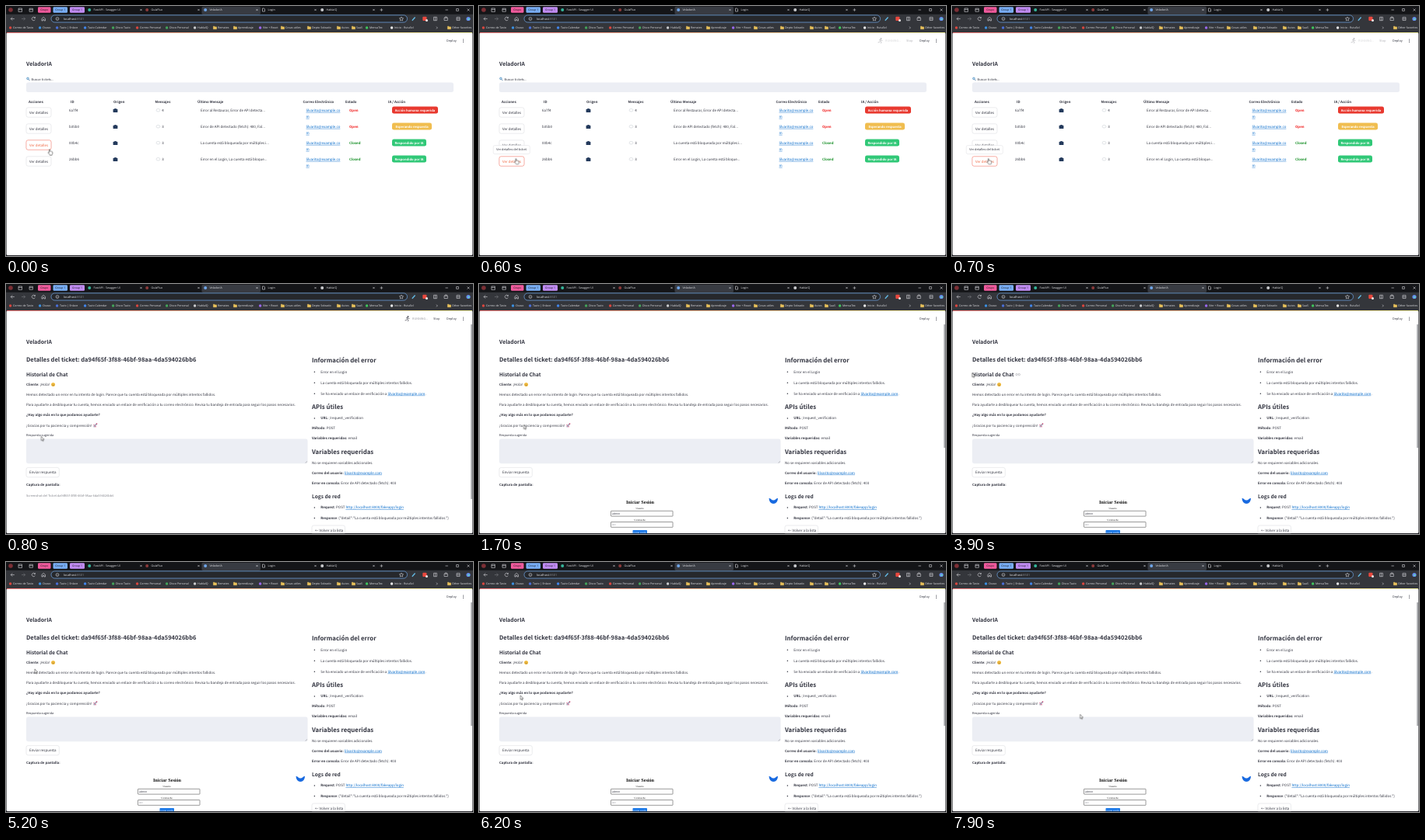
Recreate the animation shown at these times as an HTML page. Size 600 by 322 pixels, loop 8000 ms.

```html
<!DOCTYPE html>
<html lang="es">
<head>
<meta charset="utf-8">
<title>Panel de tickets</title>
<style>
html, body { margin: 0; width: 100%; height: 100%; overflow: hidden; background: #1e1f23; }
svg { display: block; width: 100vw; height: 100vh; }
text { font-family: "Noto Sans CJK JP", "Noto Sans CJK SC", "Noto Sans CJK KR", "Open Sans", sans-serif;
  text-rendering: geometricPrecision; fill: #31333f; white-space: pre; }
.b { font-weight: 700; }
tspan.b { font-size: 4.36px; }
.ui { font-family: "Open Sans", "Noto Sans", sans-serif; fill: #e6e7ea; }
.serif { font-family: "Liberation Serif", serif; fill: #111; }
.link { fill: #0068c9; text-decoration: underline; }
.mid { text-anchor: middle; }
.line { fill: none; stroke: #d8d9dd; stroke-width: .6; }
.hot rect { stroke: #ff5b45; }
.hot text { fill: #f0653f; }

.on { animation: 8s step-end infinite; }
#list, #hand { animation-name: list; }
#hover3 { animation-name: hover3; }
#hover4 { animation-name: hover4; }
#tip { animation-name: tip; }
#detail, #arrow { animation-name: detail; }
#loading { animation-name: loading; }
#loaded { animation-name: loaded; }
#anchor { animation-name: anchor; }
@keyframes list { 0% { visibility: visible } 9.3%, 100% { visibility: hidden } }
@keyframes hover3 { 0% { visibility: visible } 3.6%, 100% { visibility: hidden } }
@keyframes hover4 { 0% { visibility: hidden } 3.6% { visibility: visible } 9.3%, 100% { visibility: hidden } }
@keyframes tip { 0% { visibility: hidden } 6.2% { visibility: visible } 9.3%, 100% { visibility: hidden } }
@keyframes detail { 0% { visibility: hidden } 9.3%, 100% { visibility: visible } }
@keyframes loading { 0% { visibility: hidden } 9.3% { visibility: visible } 17.4%, 100% { visibility: hidden } }
@keyframes loaded { 0% { visibility: hidden } 17.4%, 100% { visibility: visible } }
@keyframes anchor { 0% { visibility: hidden } 31.2% { visibility: visible } 60%, 100% { visibility: hidden } }

#cursor { animation: move 8s ease-in-out infinite; }
@keyframes move {
  0% { transform: translate(56px, 184.5px) }
  6%, 8% { transform: translate(47.5px, 196.5px) }
  10%, 16% { transform: translate(45.3px, 196.3px) }
  33%, 37% { transform: translate(106px, 121.5px) }
  47.5%, 57% { transform: translate(25.8px, 114.5px) }
  75%, 80% { transform: translate(53.2px, 171.8px) }
  96%, 100% { transform: translate(164.6px, 196.3px) }
}
</style>
</head>
<body>
<svg viewBox="0 0 600 322" preserveAspectRatio="none">
  <defs>
    <linearGradient id="accent">
      <stop offset="0" stop-color="#ff4b4b"/><stop offset="1" stop-color="#fffd80"/>
    </linearGradient>
  </defs>
  <g id="chrome"></g>
  <rect x=".6" y="34" width="598.8" height="287.2" rx="1.8" fill="#fff"/>
  <rect x="1" y="34" width="598" height=".7" fill="url(#accent)"/>
  <g id="top"></g>
  <g id="list" class="on"></g>
  <g id="hover3" class="on hot"></g>
  <g id="hover4" class="on hot"></g>
  <g id="tip" class="on"></g>
  <g id="detail" class="on"></g>
  <g id="loading" class="on"></g>
  <g id="loaded" class="on"></g>
  <g id="anchor" class="on"></g>
  <rect y="321.2" width="600" height=".8" fill="#1e1f23"/>
  <g id="cursor">
    <path id="hand" class="on" fill="#fff" stroke="#222" stroke-width=".5" stroke-linejoin="round"
      d="M-.6 .4Q0-.5 .6 .4V2.7Q1.3 2.2 1.8 2.9 2.5 2.5 2.9 3.2 3.8 2.9 3.9 3.9V5.4Q3.8 6.4 3.2 7.2H.2Q-.9 5.8-2 4.3-1.9 3.3-.6 4.2Z"/>
    <path id="arrow" class="on" fill="#fff" stroke="#222" stroke-width=".5" stroke-linejoin="round"
      d="M0 0V5.4L1.2 4.3 2.1 6.2 2.9 5.8 2.1 4H3.8Z"/>
  </g>
</svg>
<script>
const BODY = 4.48, STRONG = 4.36, SMALL = 3.92, H2 = 7.85, H3 = 6.55;
const MAIL = 'lilvarito@example.com';
const APP = 'VeladorIA';

const put = (id, ...parts) => { document.getElementById(id).innerHTML = parts.flat().join(''); };
// y is the middle of the capital letters
const text = (x, y, str, size = BODY, cls = '', extra = '') =>
  `<text x="${x}" y="${y + size * .367}" font-size="${size}" class="${cls}" ${extra}>${str}</text>`;
const bold = (x, y, str, size = STRONG) => text(x, y, str, size, 'b');
const rect = (x, y, w, h, fill, r = 0, extra = '') =>
  `<rect x="${x}" y="${y}" width="${w}" height="${h}" rx="${r}" fill="${fill}" ${extra}/>`;
const dot = (x, y, r, fill) => `<circle cx="${x}" cy="${y}" r="${r}" fill="${fill}"/>`;
const path = (d, extra = '') => `<path class="line" d="${d}" ${extra}/>`;
const button = (x, y, w, label, h = 12.4) =>
  rect(x, y - h / 2, w, h, '#fff', 2.4, 'stroke="#d3d4d8" stroke-width=".45"') + text(x + 4, y, label);
const strong = s => `<tspan class="b">${s}</tspan>`;
const link = s => `<tspan class="link">${s}</tspan>`;
const bullet = (y, str) => dot(396.4, y + .2, .75, '#31333f') + text(404.3, y, str);
const scrollbar = end => rect(597.4, 52, 1.3, end - 52, '#85878c', .6);

// Browser window
const ui = (x, y, str, size = 3.6, extra = '') => text(x, y, str, size, 'ui', extra);
const close = x => path(`M${x - 1.1} 3.9l2.2 2.2m0-2.2l-2.2 2.2`);
const folder = x => path(`M${x - 2} 26.2h1.5l.6.7h2v2.8h-4.1z`, 'style="stroke:#e9c25b;fill:#e9c25b"');
const groups = [[41, 16.5, 'Grupo', '#ef5a9c'], [60.5, 18.5, 'Group 1', '#78adf5'], [82, 19, 'Group 1', '#c08bf2']];
const tabs = [[107, 'FastAPI - Swagger UI', '#35b59a'], [181, 'GuíaFlux', '#8c3a3a'], [256, APP, '#6fa5e8'],
  [331, 'Login', ''], [406, 'HablaIQ', '#c9cacd']];
const marks = [[9, 'Correo de Tavio', '#d9473f'], [47, 'Ocaso', '#3b8fe0'], [69, 'Tavio | Enlace', '#4a6fd8'],
  [105, 'Tavio Calendar', '#4285e8'], [141, 'Disco Tavio', '#43a25a'], [172, 'Correo Personal', '#d9473f'],
  [210, 'Disco Personal', '#43a25a'], [246, 'HablaIQ', '#c9cacd'], [272, 'Remates'], [298, 'Aprendizaje'],
  [330, 'Vite + React', '#9a68f0'], [359, 'Cosas utiles'], [393, 'Depto Soleado'], [431, 'Autos'],
  [450, 'SaaS'], [467, 'MensaTex', '#3fc35c'], [499, 'Inicio - RutaSol', '#e8e8e8'], [573, 'Other favorites']];

put('chrome',
  rect(0, 0, 600, 11, '#141518'),
  rect(0, 10.7, 600, 24, '#34363b'),
  dot(6, 5, 2.8, '#7c2f35'),
  path('M16 3h4.5v4.4H16zM16 4.6h4.5M30 3.2h4.4v4H30zM30 4.6h4.4'),
  groups.map(([x, w, s, c]) => rect(x, 1.2, w, 7.6, c, 1.4) +
    ui(x + w / 2, 5, s, 3.4, 'style="fill:#16171a;text-anchor:middle"')),
  rect(251.5, .8, 75.5, 10.2, '#383b42', 1.8),
  tabs.map(([x, s, c]) => (c ? dot(x + .2, 5, 2, c) : path(`M${x - 1.5} 3h2l1 1v3h-3z`)) +
    ui(x + 5.5, 5, s, 3.65) + close(x + 66.5)),
  path('M480.6 5h3.6m-1.8-1.8v3.6'),
  path('M564.5 5h3.4M578.6 3.5h2.8v2.8h-2.8zM592.6 3.5l3 3m0-3l-3 3'),
  path('M6.2 16.5h4.6M8.2 14.4l-2 2.1 2 2.1'),
  path('M20 16.5h4.6m-2-2.1l2 2.1-2 2.1', 'style="stroke:#77797f"'),
  path('M37.3 15.3a2.2 2.2 0 1 0 .1 2.2M37.4 13.9v1.6h-1.6'),
  path('M45.9 16.3l2.3-2 2.3 2v2.7h-1.5v-1.7h-1.6v1.7h-1.5z'),
  rect(58, 11.8, 457.5, 9.2, '#26282c', 4.6, 'stroke="#74aef0" stroke-width=".7"'),
  '<circle class="line" cx="66" cy="16.5" r="1.9"/>', path('M66 16.2v1.2'),
  ui(74, 16.5, 'localhost<tspan fill="#8f9197">:8501</tspan>', 3.9),
  path('M508 14l.8 1.6 1.8.2-1.3 1.2.3 1.8-1.6-.8-1.6.8.3-1.8-1.3-1.2 1.8-.2z'),
  path('M521.8 18.8l3.8-4.3', 'style="stroke:#64bde8;stroke-width:1.3"'),
  rect(535.3, 13.8, 5.2, 5.2, '#e8483e', 1), dot(540.5, 18.5, 1.5, '#f1f1f1'),
  path('M549.5 14.3h4v4.4h-4zM551.5 14.3v4.4M563 15.3h4.4v3.2H563zM564 15.3v-1.3h2.4v1.3'),
  path('M579 14.5h4v4h-4zM579 16.5h4'),
  dot(594, 16.5, 2.6, '#668df0'), dot(594.5, 16.9, 1.2, '#62d5bc'),
  marks.map(([x, s, c]) => (c ? dot(x - 3.4, 28, 1.75, c) : folder(x - 3.6)) + ui(x, 28, s)),
  path('M553 26.6l1.4 1.4-1.4 1.4'));

// Shared page header
const runner = (opacity) => `<g opacity="${opacity}">` + dot(516.5, 42, .9, '#31333f') +
  path('M514 43.8l2-.6 1.1 1.4 1.3-.3M516 43.4l-.6 2 1.6 1-.6 1.8M515.2 45.5l-.8 1.2-1.8.2',
    'style="stroke:#31333f;stroke-width:.7"') + text(522, 44.8, 'RUNNING...', 3.8, '', 'opacity=".55"') +
  text(549, 44.8, 'Stop', SMALL) + '</g>';
put('top',
  text(566, 44.8, 'Deploy', SMALL),
  [43.1, 44.8, 46.5].map(y => dot(587.6, y, .52, '#31333f')),
  bold(26, 74, APP, 6.9));

// Ticket list
const heads = [[29, 'Acciones'], [83, 'ID'], [138, 'Origen'], [191.5, 'Mensajes'], [246, 'Último Mensaje'],
  [381.5, 'Correo Electrónico'], [436, 'Estado'], [491, 'IA / Acción']];
const human = [59, '#e8392f', 'Acción humana requerida'];
const waiting = [51, '#f0bd4f', 'Esperando respuesta'];
const solved = [44, '#30c877', 'Respondido por IA'];
const rows = [
  ['6a7f4', 4, 'Error al Restaurar, Error de API detecta...', true, human],
  ['b35b0', 3, 'Error de API detectado (fetch): 400, Fal...', true, waiting],
  ['00b4c', 3, 'La cuenta está bloqueada por múltiples i...', false, solved],
  ['26bb6', 3, 'Error en el Login, La cuenta está bloque...', false, solved]];
const rowButton = i => button(26, 137 + 21 * i, 32, 'Ver detalles');

put('list',
  '<circle cx="28" cy="93.4" r="1.4" fill="#bfe0f5" stroke="#3f7fb4" stroke-width=".6"/>',
  path('M29 94.5l1.5 1.5', 'style="stroke:#3f6f9c;stroke-width:.9"'),
  text(32.6, 94.2, 'Buscar tickets...', SMALL),
  rect(26, 98.6, 549, 12.5, '#eceef4', 2.4),
  heads.map(([x, s]) => bold(x, 123.5, s)),
  rows.map(([id, count, msg, open, [w, fill, label]], i) => {
    const y = 134.2 + 21 * i;
    return rowButton(i) + text(81, y, id) +
      rect(137.6, y - 1.4, 5.8, 4.2, '#243a5c', .6) + rect(139.3, y - 2.3, 2.4, 1.2, '#243a5c', .4) +
      `<ellipse cx="195.5" cy="${y}" rx="2.4" ry="1.8" fill="#fff" stroke="#c3c8ce" stroke-width=".5"/>` +
      text(200.3, y, count) + text(250, y, msg) +
      text(385.5, y, MAIL.slice(0, -1), BODY, 'link') + text(385.5, y + 8, MAIL.slice(-1), BODY, 'link') +
      text(441, y, open ? 'Open' : 'Closed', STRONG, 'b', `style="fill:${open ? '#f01818' : '#0b8a1c'}"`) +
      rect(496, y - 4.6, w, 9, fill, 2.4) +
      text(496 + w / 2, y, label, 4.1, 'b mid', 'style="fill:#fff"');
  }));
put('hover3', rowButton(2));
put('hover4', rowButton(3));
put('tip',
  rect(18.3, 179.6, 47, 11, '#fff', 2, 'stroke="#dcdde1" stroke-width=".5"'),
  text(22.3, 185, 'Ver detalles del ticket', SMALL), runner(.35));

// Ticket detail
const uuid = 'da94f65f-3f88-46bf-98aa-4da594026bb6';
put('detail',
  bold(26, 97.7, 'Detalles del ticket: ' + uuid, 7.52),
  bold(26, 116.2, 'Historial de Chat', H3),
  text(26, 129.6, strong('Cliente:') + ' ¡Hola!'),
  dot(60.6, 129.5, 2.5, '#f6c044'), dot(59.7, 129, .35, '#5a3b12'), dot(61.5, 129, .35, '#5a3b12'),
  path('M59.3 130.2q1.3 1.3 2.6 0', 'style="stroke:#5a3b12;stroke-width:.4"'),
  text(26, 142.8, 'Hemos detectado un error en tu intento de login. Parece que tu cuenta está bloqueada por múltiples intentos fallidos.'),
  text(26, 155.8, 'Para ayudarte a desbloquear tu cuenta, hemos enviado un enlace de verificación a tu correo electrónico. Revisa tu bandeja de entrada para seguir los pasos necesarios.'),
  bold(26, 168.8, '¿Hay algo más en lo que podamos ayudarte?'),
  text(26, 182, '¡Gracias por tu paciencia y comprensión!'),
  path('M113.2 183.6l3-3.2', 'style="stroke:#a9a4b8;stroke-width:1.9;stroke-linecap:round"'),
  dot(116.6, 180, .8, '#d43f72'), dot(113, 181.6, .7, '#d43f72'), dot(115, 183.8, .7, '#d43f72'),
  text(26, 194.6, 'Respuesta sugerida', SMALL),
  rect(26, 199.6, 361.6, 31.6, '#eceef4', 2.4),
  path('M384.6 230.4l2.2-2.2M386 230.4l.8-.8', 'style="stroke:#777;stroke-width:.4"'),
  button(26, 242.6, 42.3, 'Enviar respuesta'),
  bold(26, 258.2, 'Captura de pantalla:'),

  bold(393, 97.7, 'Información del error', H2),
  bullet(113, 'Error en el Login'),
  bullet(127, 'La cuenta está bloqueada por múltiples intentos fallidos.'),
  bullet(141, `Se ha enviado un enlace de verificación a ${link(MAIL)}.`),
  bold(393, 157.9, 'APIs útiles', H2),
  bullet(172.7, strong('URL:') + ' /request_verification'),
  text(393, 185.6, strong('Método:') + ' POST'),
  text(393, 198.6, strong('Variables requeridas:') + ' email'),
  bold(393, 216, 'Variables requeridas', H2),
  text(393, 230, 'No se requieren variables adicionales.'),
  text(393, 243, `${strong('Correo del usuario:')} ${link(MAIL)}`),
  text(393, 256, strong('Error en consola:') + ' Error de API detectado (fetch): 403'),
  bold(393, 273.2, 'Logs de red', H3),
  bullet(287.8, `${strong('Request')}: POST ${link('http://localhost:8000/fakeapp/login')}`),
  bullet(301.2, strong('Response') + ': {"detail":"La cuenta está bloqueada por múltiples intentos fallidos."}'),
  button(393, 317.2, 42.5, '← Volver a la lista'));
put('loading',
  runner(.9),
  text(26, 273, 'Screenshot del Ticket ' + uuid, SMALL, '', 'opacity=".6"'),
  scrollbar(277));

// Login screenshot inside the ticket
const serif = (x, y, str, size, cls = 'mid') => text(x, y, str, size, 'serif ' + cls);
const field = (y, str) => rect(169.5, y, 79.5, 6.8, '#fff', .5, 'stroke="#555" stroke-width=".6"') +
  text(171, y + 3.4, str, 3.4);
put('loaded',
  scrollbar(211),
  serif(207, 280.4, 'Iniciar Sesión', 6.2, 'mid b'),
  serif(206.5, 289.2, 'Usuario', 3.2),
  field(292.3, 'admin'),
  serif(206.5, 303.4, 'Contraseña', 3.2),
  field(306.5, '••••'),
  rect(197.5, 317, 18.5, 5, '#1877e8', .8),
  text(206.8, 320, 'Iniciar sesión', 2.7, 'mid', 'style="fill:#fff"'),
  '<path fill="#1769e0" d="M372.5 276Q374 275.8 375 277Q378.3 280 381.6 277Q382.6 275.8 384.1 276Q383.4 283 378.3 283T372.5 276Z"/>');
put('anchor', path('M84.2 115.4h-1.1a1.2 1.2 0 0 0 0 2.4h1.1M85.2 115.4h1.1a1.2 1.2 0 0 1 0 2.4h-1.1M83.5 116.6h2.4',
  'style="stroke:#8f9198;stroke-width:.5"'));
</script>
</body>
</html>
```
